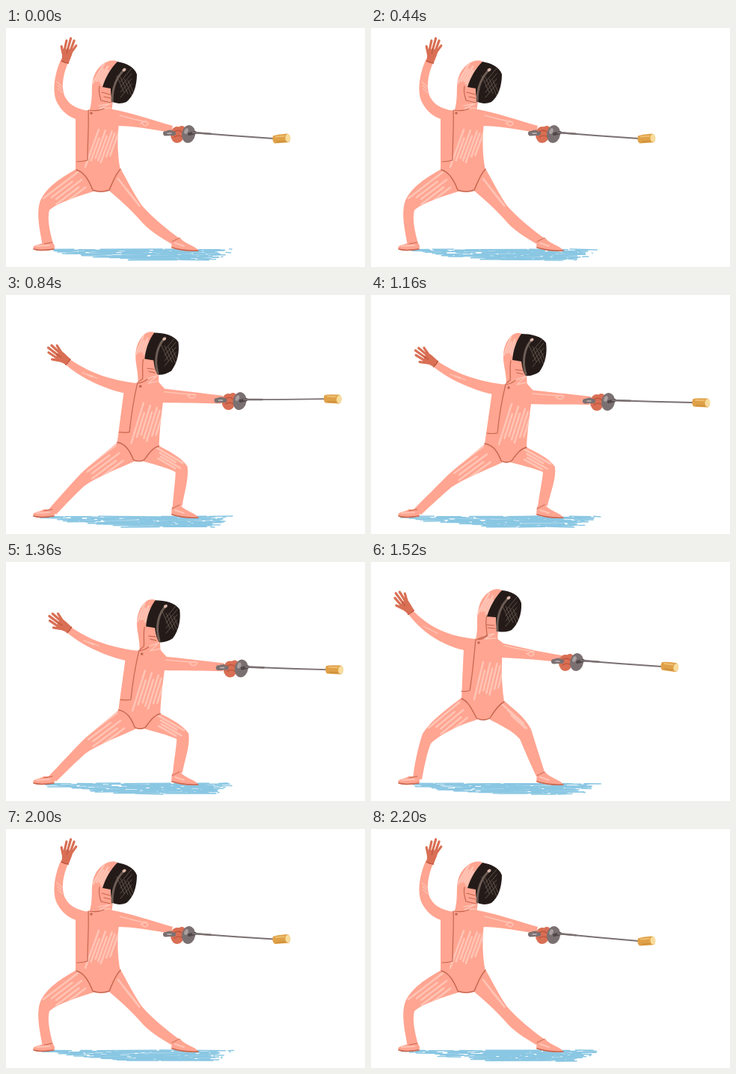
These frames come from a looping animation (480x320 px, 2240 ms). An HTML page with a canvas:

```html
<!DOCTYPE html>
<html>
<head>
<meta charset="utf-8">
<style>
html, body { margin: 0; width: 480px; height: 320px; overflow: hidden; background: #fff; }
canvas { display: block; }
</style>
</head>
<body>
<canvas id="stage" width="480" height="320"></canvas>
<script>
const ctx = document.getElementById('stage').getContext('2d');
const LOOP = 2240, STEP = 40;
const SUIT = '#ffa591', LIGHT = '#ffc4b5', SEAM = '#c7664f', GLOVE = '#d96f54';
const MASK = '#241b19', STEEL = '#7b7071', WATER = '#8ac7e3';

// Each shape is given for the guard, halfway and lunge poses.
const shapes = {
  backArm: [
    'M74,41 C66,58 60,85 69,101 C75,112 84,119 94,122 L113,111 C100,110 86,105 80,94 C73,82 76,62 83,47 Z',
    'M49,69 C57,79 68,91 82,100 C96,109 110,115 124,118 L141,103 C124,102 104,97 90,90 C76,83 65,74 56,65 Z',
    'M82,95 C92,103 104,111 117,117 C132,124 148,130 163,133 L182,120 C166,119 144,114 130,109 C115,104 100,96 88,88 Z'],
  backLeg: [
    'M94,189 C74,200 54,213 46,231 C40,247 45,270 49,291 L63,289 C58,270 55,255 58,244 C66,236 92,226 117,219 L125,200 Z',
    'M121,182 C105,194 80,212 69,230 C64,244 58,270 56,291 L68,291 C71,275 75,254 80,243 C92,231 118,218 142,211 L148,195 Z',
    'M154,198 C138,212 118,228 104,240 C88,256 70,274 55,289 L67,294 C80,282 96,267 108,257 C124,246 152,235 176,224 L180,205 Z'],
  frontLeg: [
    'M153,188 C162,204 172,224 182,238 C196,254 216,270 231,281 L221,289 C206,280 190,270 180,258 C166,242 152,230 138,218 L130,200 Z',
    'M178,186 C190,196 206,208 214,224 C219,240 226,262 232,281 L221,287 C213,270 206,254 199,237 C188,225 172,218 159,211 L152,195 Z',
    'M206,203 C220,210 238,218 246,230 C248,246 240,264 236,282 L223,284 C225,266 229,250 230,237 C218,232 202,228 186,224 L184,205 Z'],
  torso: [
    'M93,117 L112,109 L143,109 L153,116 C150,130 147,160 153,190 C146,200 142,212 138,218 C130,220 122,220 116,218 C111,205 104,195 93,190 Z',
    'M124,115 L140,102 L168,102 L177,109 C174,130 174,160 178,187 C170,194 165,204 159,210 C153,212 147,212 142,210 C137,200 130,188 121,182 Z',
    'M162,129 L181,118 L208,118 L217,128 C214,145 209,180 208,205 C199,208 194,218 188,223 C184,225 178,225 174,223 C170,212 165,204 152,199 Z'],
  pelvis: [
    'M94,190 C104,192 111,204 116,217 Q127,221 138,217 C142,208 146,196 153,189',
    'M121,183 C130,186 136,199 141,209 Q150,214 159,209 C164,201 170,191 178,187',
    'M152,199 C165,201 170,212 174,222 Q181,226 188,222 C194,214 199,206 208,204'],
  placket: [
    'M110,110 C111,130 109,155 109,177 Q102,179 95,179 M112,110 Q122,112 131,108',
    'M140,104 C138,122 136,150 132,172 Q127,174 121,173 M140,104 Q150,104 156,98',
    'M180,120 C175,140 171,165 169,185 Q162,186 155,185 M180,120 Q190,118 193,114'],
  hood: [
    'M149,45 C140,40 123,48 117,66 C113,80 117,90 112,110 L141,113 L143,98 L149,60 Z',
    'M175,38 C166,32 148,42 144,62 C140,76 144,86 140,104 L169,106 L170,92 L176,60 Z',
    'M202,52 C190,46 178,62 177,80 C176,92 181,102 181,120 L209,126 L208,106 L204,70 Z'],
  collar: [
    'M125,78 C123,86 126,92 127,97 L140,100 M128,86 L139,89 M131,92 L140,94',
    'M155,72 C152,82 155,90 155,98 L143,103 M155,84 L165,85 M156,88 L166,89',
    'M187,88 C185,98 187,106 186,114 L181,118 M193,100 L202,101 M195,104 L203,106'],
  mask: [
    'M149,45 C160,47 172,52 175,62 C175,78 170,92 161,99 C154,102 147,101 143,99 C140,92 140,86 140,81 L129,79 C133,66 140,54 149,45 Z',
    'M175,38 C187,39 198,44 201,55 C202,70 196,84 188,91 C182,94 175,94 170,93 C167,86 167,80 167,74 L155,73 C159,60 166,47 175,38 Z',
    'M201,52 C214,52 228,55 234,64 C236,78 233,92 225,103 C219,107 212,109 207,108 C203,103 202,96 201,89 L189,87 C190,74 194,62 201,52 Z'],
  rim: [
    'M159,55 C147,66 142,82 142,98',
    'M185,47 C173,58 168,74 169,92',
    'M216,59 C206,68 201,88 207,106'],
  frontArm: [
    'M143,109 C165,113 195,123 223,131 L221,140 C198,136 170,131 148,131 Z',
    'M168,107 C195,113 228,121 255,125 L252,134 C225,131 200,129 175,128 Z',
    'M208,127 C235,129 265,133 294,136 L292,147 C265,146 240,147 212,146 Z'],
  armFold: [
    'M152,117 Q170,122 188,126 M180,128 Q188,122 190,128 Q186,134 182,128',
    'M178,112 Q198,117 218,120 M208,123 Q216,118 218,123 Q214,129 210,123',
    'M216,132 Q236,134 256,135 M247,137 Q255,132 258,136 Q254,142 249,138']
};
// Hatching: first stroke (x1, y1, x2, y2), then the shift to the next one.
const hatches = {
  torso: [7, [106,186,124,136,5,-1], [138,184,150,134,5,-1], [171,200,188,146,5,0]],
  backLeg: [5, [50,228,96,193,4,4], [77,222,118,188,4,4], [100,240,150,203,4,4]],
  frontLeg: [4, [150,202,174,232,3,4], [176,191,204,216,3,4], [204,206,240,226,-1,4]],
  hood: [5, [116,74,131,48,3,1], [143,69,158,42,3,1], [178,80,187,56,3,1]],
  backArm: [3, [68,72,76,79,0,4], [70,86,82,92,4,2], [106,106,119,112,4,1]]
};
const neckFold = [
  'M124,104 L140,101 L125,108 L140,107',
  'M150,99 L165,96 L152,103 L167,102',
  'M192,114 L207,109 L195,120 L208,117'];
shapes.neckFold = neckFold;
const grip = [[244,142,-4], [275,134,8], [317,143,3]];
const backHand = [[79,45,12], [53,67,-40], [86,92,-58]];
const meshAt = [[160,76], [187,69], [223,79]];

const advance = [[0,0], [560,0], [640,.25], [720,.72], [800,.91], [840,.935], [1000,.985],
  [1160,1], [1340,1], [1400,.9], [1460,.68], [1520,.4], [1580,.17], [1640,.03], [1680,0], [LOOP,0]];
const tipDrop = [[0,6], [200,7], [440,6], [560,6], [680,9], [840,-3], [960,3], [1160,1],
  [1340,1], [1520,6], [1640,3], [1760,10], [1960,5], [2200,8], [LOOP,6]];

function track(keys, t) {
  const i = keys.findIndex(k => k[0] > t);
  const [a, u] = keys[i - 1], [b, v] = keys[i];
  return u + (v - u) * (t - a) / (b - a);
}

// The halfway pose lies at 0.4 of the advance.
const weights = p => p < .4 ? [1 - p / .4, p / .4, 0] : [0, (1 - p) / .6, (p - .4) / .6];
const mix = (poses, w) => poses[0].map((_, i) => poses.reduce((sum, pose, k) => sum + pose[i] * w[k], 0));
const parsed = Object.fromEntries(Object.entries(shapes).map(([name, d]) =>
  [name, d.map(s => s.match(/-?[\d.]+/g).map(Number))]));

function shape(name, w) {
  const v = mix(parsed[name], w);
  let i = 0;
  return new Path2D(shapes[name][0].replace(/-?[\d.]+/g, () => v[i++].toFixed(2)));
}

function fill(path, color) {
  ctx.fillStyle = color;
  ctx.fill(path);
}

function stroke(path, color, width = 1) {
  ctx.strokeStyle = color;
  ctx.lineWidth = width;
  ctx.stroke(path);
}

function ellipse(x, y, rx, ry, color, angle = 0) {
  const path = new Path2D();
  path.ellipse(x, y, rx, ry, angle, 0, 7);
  fill(path, color);
}

function placed(x, y, degrees, draw) {
  ctx.save();
  ctx.translate(x, y);
  ctx.rotate(degrees * Math.PI / 180);
  draw();
  ctx.restore();
}

function clipped(path, draw) {
  ctx.save();
  ctx.clip(path);
  draw();
  ctx.restore();
}

function random(seed) {
  return () => {
    seed = (seed * 16807 + 11) % 2147483647;
    return seed / 2147483647;
  };
}

function drawWater(t) {
  const rnd = random(Math.floor(t / 80) * 977 + 4321);
  for (let i = 0; i < 8; i++) rnd();
  const path = new Path2D();
  for (let y = 296; y < 311; y++) {
    const k = y - 296;
    let x = 36 + 2.5 * k ** 1.45 + rnd() * 26;
    const end = 308 - 1.7 * k - rnd() * 18;
    while (x < end) {
      const sparse = x < 115 || x > 225;
      const next = Math.min(end, x + (sparse ? 12 + rnd() * 38 : 30 + rnd() * 60));
      path.moveTo(x, y + rnd());
      path.lineTo(next, y + rnd());
      x = next + 2 + rnd() * (sparse ? 15 : 4);
    }
  }
  stroke(path, WATER, 1.5);
}

function drawFeet() {
  const back = new Path2D('M50,287 C46,291 37,289 36,295 Q40,299 50,298 L64,296 Q67,292 62,287 Z');
  const front = new Path2D('M222,283 L233,281 C238,289 253,291 257,298 C244,300 228,297 221,294 Z');
  fill(back, SUIT);
  fill(front, SUIT);
  stroke(new Path2D('M41,292 L58,291 M226,288 L238,292'), LIGHT, 2);
  stroke(new Path2D('M37,296 Q46,299 64,296 M222,294 Q238,299 257,298'), SEAM, 1.5);
  stroke(new Path2D('M51,289 L62,287 M222,286 L232,281'), SEAM);
}

function hatch(name, w) {
  const [count, ...poses] = hatches[name];
  const [x1, y1, x2, y2, dx, dy] = mix(poses, w);
  const path = new Path2D();
  for (let i = 0; i < count; i++) {
    const a = .2 * Math.abs(Math.sin(i * 2.3)), b = 1 - .25 * Math.abs(Math.sin(i * 1.7));
    const at = f => [x1 + (x2 - x1) * f + dx * i, y1 + (y2 - y1) * f + dy * i];
    path.moveTo(...at(a));
    path.lineTo(...at(b));
  }
  stroke(path, LIGHT, name === 'backArm' ? 1.2 : 2.6);
}

function drawPart(name, w) {
  const path = shape(name, w);
  fill(path, SUIT);
  if (hatches[name]) clipped(path, () => hatch(name, w));
}

function drawBackHand(w) {
  placed(...mix(backHand, w), () => {
    fill(new Path2D('M-5,1 C-4,-6 -8,-10 -6,-16 L7,-18 C8,-12 6,-6 5,2 Z'), GLOVE);
    stroke(new Path2D('M-5,-10 L-9,-19 M-4,-15 L-4,-28 M0,-16 L1,-32 M4,-16 L6,-30 M6,-15 L10,-24'), GLOVE, 3.2);
    stroke(new Path2D('M-5,0 Q0,2 5,1 M0,-18 L0,-11'), '#b8523c');
  });
}

function drawHead(w) {
  const mask = shape('mask', w);
  drawPart('hood', w);
  stroke(shape('neckFold', w), LIGHT, 1.5);
  stroke(shape('collar', w), SEAM, 1.2);
  fill(mask, MASK);
  const [x, y] = mix(meshAt, w), mesh = new Path2D();
  for (let i = -1; i < 3; i++) {
    mesh.moveTo(x + i * 5 - 7, y + i * 2 - 10);
    mesh.lineTo(x + i * 5 + 3, y + i * 2 + 12);
    mesh.moveTo(x - 7, y + i * 7 + 3);
    mesh.lineTo(x + 8, y + i * 7 - 15);
  }
  clipped(mask, () => stroke(mesh, '#65564d', .9));
  const [rx, ry] = mix(parsed.rim, w);
  stroke(shape('rim', w), '#6d5d55', 3);
  ellipse(rx - 1, ry + 1, 2.6, 2, '#d8b5a6', -.5);
}

function drawFoil(w, drop) {
  const [x, y, turn] = mix(grip, w);
  placed(x, y, 0, () => {
    stroke(new Path2D('M-31,-1 Q-23,-5 -17,-1 L-31,0'), STEEL, 5);
    ellipse(-15, 1, 9, 11, GLOVE);
    ellipse(-9, -6, 5, 5, GLOVE);
    stroke(new Path2D('M-21,-2 Q-14,-7 -9,-3 M-19,4 Q-13,0 -8,4'), '#b8523c', 1.2);
    stroke(new Path2D('M-31,-1 L-20,-1'), STEEL, 6);
    stroke(new Path2D('M-28,-1 L-23,-1'), '#c3b9b8', 1.5);
    ellipse(0, 0, 9, 12, STEEL, .15);
    ellipse(-3, -4, 2.5, 4, '#aaa0a0', .4);
    stroke(new Path2D('M1,0 L9,-2'), '#514748', 4);
    stroke(new Path2D(`M6,-2 Q60,${drop * .5 - .5} 114,${drop}`), STEEL, 1.8);
    stroke(new Path2D(`M6,-2 L30,${drop * .2 - 1.4}`), STEEL, 2.6);
    placed(124, drop, turn, () => {
      fill(new Path2D('M-11,-4 Q-9,-6 9,-6 Q12,-4 12,0 Q12,5 9,6 L-9,6 Q-13,3 -11,-4 Z'), '#dfa148');
      stroke(new Path2D('M-7,-3 L4,-3'), '#efbf70', 2);
      stroke(new Path2D('M-6,4 L5,4'), '#c88a38', 1.2);
      ellipse(9, 0, 3.5, 5.3, '#f8dc9c');
    });
  });
}

function draw(t) {
  const w = weights(track(advance, t));
  ctx.clearRect(0, 0, 480, 320);
  ctx.lineCap = ctx.lineJoin = 'round';
  drawWater(t);
  for (const name of ['backArm', 'backLeg', 'frontLeg', 'torso']) drawPart(name, w);
  drawFeet();
  drawBackHand(w);
  drawHead(w);
  drawPart('frontArm', w);
  stroke(shape('armFold', w), LIGHT, 1.5);
  stroke(shape('placket', w), SEAM, 1.2);
  stroke(shape('pelvis', w), SEAM, 1.4);
  const [bx, by] = mix(parsed.placket, w);
  ellipse(bx + 4, by + 4, 1.8, 1.8, SEAM);
  drawFoil(w, track(tipDrop, t));
}

const start = performance.now();
function tick() {
  const t = (performance.now() - start) % LOOP;
  draw(Math.floor(t / STEP) * STEP);
  requestAnimationFrame(tick);
}
tick();
</script>
</body>
</html>
```
